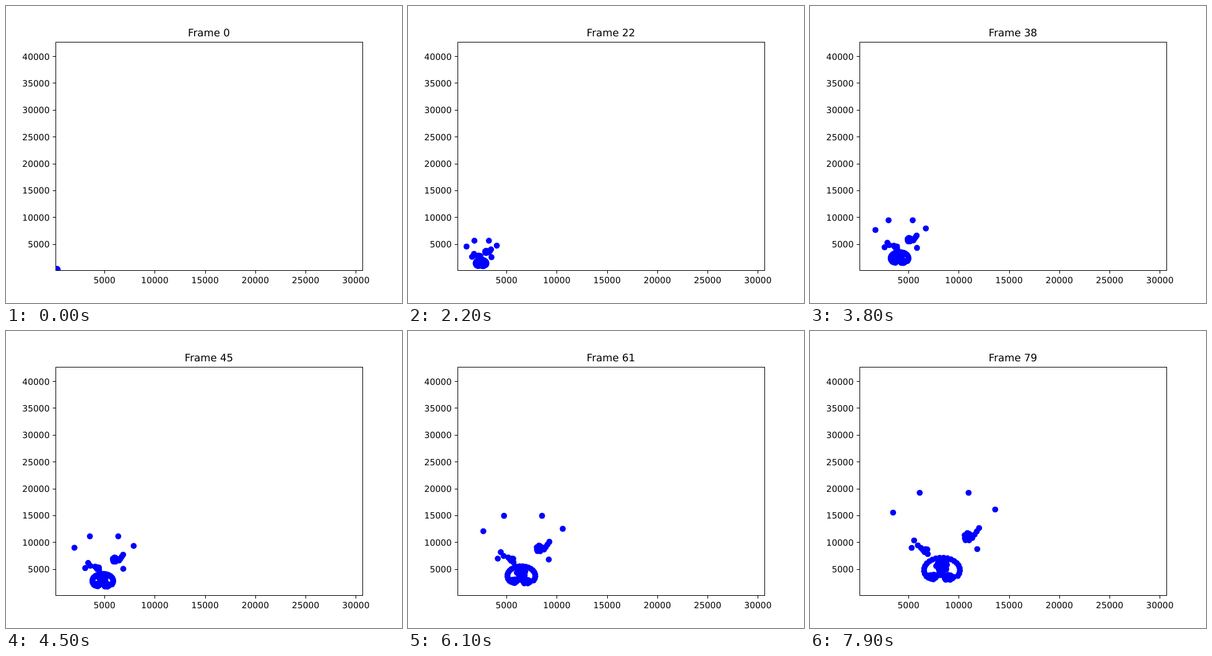
An HTML page with a canvas that plays this animation: 640 px wide and 480 px high, repeating every 8 s.

```html
<!DOCTYPE html>
<html lang="en">
<head>
<meta charset="utf-8">
<title>Scatter animation</title>
<style>
  html, body { margin: 0; width: 100%; height: 100%; overflow: hidden; background: #fff; }
  canvas { display: block; }
</style>
</head>
<body>
<canvas id="plot" width="640" height="480"></canvas>
<script>
const ctx = document.getElementById('plot').getContext('2d');
const STEP = 100, COUNT = 80, RADIUS = 4.86;
const ORIGIN = { x: 77.9, y: 428 };
const GOLDEN = Math.PI * (3 - Math.sqrt(5));

const spread = (count, place) => Array.from({ length: count }, (_, i) => place(i));

const row = (x1, y1, x2, y2, count) => spread(count, i => {
  const k = i / (count - 1);
  return [x1 + (x2 - x1) * k, y1 + (y2 - y1) * k];
});

const arc = (cx, cy, rx, ry, from, to, count) => spread(count, i => {
  const a = (from + (to - from) * i / (count - 1)) * Math.PI / 180;
  return [cx + rx * Math.cos(a), cy + ry * Math.sin(a)];
});

const blob = (cx, cy, rx, ry, count) => spread(count, i => {
  const r = Math.sqrt((i + 0.5) / count), a = i * GOLDEN;
  return [cx + rx * r * Math.cos(a), cy + ry * r * Math.sin(a)];
});

// Final places of the dots, and how far each group's path bends on the way
const groups = [
  { bend: [0, 0], dots: [[134, 293], [177, 261], [256, 261], [299, 288], [270, 352], [164, 350]] },
  { bend: [10, -6], dots: [[168, 338], [174, 346]] },
  { bend: [30, -10], dots: [...row(179, 350, 190, 360, 4), ...blob(186, 354, 4.5, 3, 7)] },
  { bend: [-8, -13], dots: row(273, 318, 262, 334, 4) },
  { bend: [-20, -14], dots: blob(255, 332.5, 7, 6.5, 16) },
  { bend: [0, 0], dots: [
    ...arc(213, 386, 29, 20, 150, 388, 20),
    ...blob(197, 397, 7.5, 4.5, 14),
    ...blob(224, 398, 9, 4.5, 16),
    ...row(204, 394, 217, 394, 3),
    ...blob(213, 379, 10, 9.5, 20),
    ...row(210, 387, 210, 394, 2)
  ] }
];

function label(text, x, y, size, align) {
  ctx.font = `${size}px "DejaVu Sans", sans-serif`;
  ctx.textRendering = 'geometricPrecision';
  ctx.textAlign = align;
  ctx.fillText(text, x, y);
}

function line(x1, y1, x2, y2) {
  ctx.beginPath();
  ctx.moveTo(x1, y1);
  ctx.lineTo(x2, y2);
  ctx.stroke();
}

function drawDots(frame) {
  // Every dot flies out from near the origin
  const grow = lead => (frame + lead) / (COUNT - 1 + lead);
  const sx = grow(2), sy = grow(1.5);
  const k = frame / (COUNT - 1), sway = k * (1 - k);
  ctx.save();
  ctx.beginPath();
  ctx.rect(80, 58, 496, 369.5);
  ctx.clip();
  ctx.fillStyle = '#00f';
  for (const { bend, dots } of groups) {
    for (const [x, y] of dots) {
      const px = ORIGIN.x + (x + 0.3 - ORIGIN.x) * sx + bend[0] * sway;
      const py = ORIGIN.y + (y + 0.5 - ORIGIN.y) * sy + bend[1] * sway;
      ctx.beginPath();
      ctx.arc(px, py, RADIUS, 0, 2 * Math.PI);
      ctx.fill();
    }
  }
  ctx.restore();
}

function drawAxes() {
  ctx.strokeStyle = ctx.fillStyle = '#000';
  ctx.lineWidth = 1;
  ctx.strokeRect(80.5, 58.5, 496, 369);
  for (let i = 1; i <= 6; i++) {
    const x = ORIGIN.x + i * 81.25, pixel = Math.round(x) + 0.5;
    line(pixel, 427.5, pixel, 432.5);
    label(i * 5000, x, 448, 13.89, 'center');
  }
  for (let i = 1; i <= 8; i++) {
    const y = ORIGIN.y - i * 43.36, pixel = Math.round(y) + 0.5;
    line(75.5, pixel, 80.5, pixel);
    label(i * 5000, 70.5, Math.round(y + 5.5), 13.89, 'right');
  }
}

let shown = -1;
function tick(now) {
  const frame = Math.floor(now / STEP) % COUNT;
  if (frame !== shown) {
    shown = frame;
    ctx.fillStyle = '#fff';
    ctx.fillRect(0, 0, 640, 480);
    drawDots(frame);
    drawAxes();
    label('Frame ' + frame, 328, 49, 16.67, 'center');
  }
  requestAnimationFrame(tick);
}
tick(0);
</script>
</body>
</html>
```
